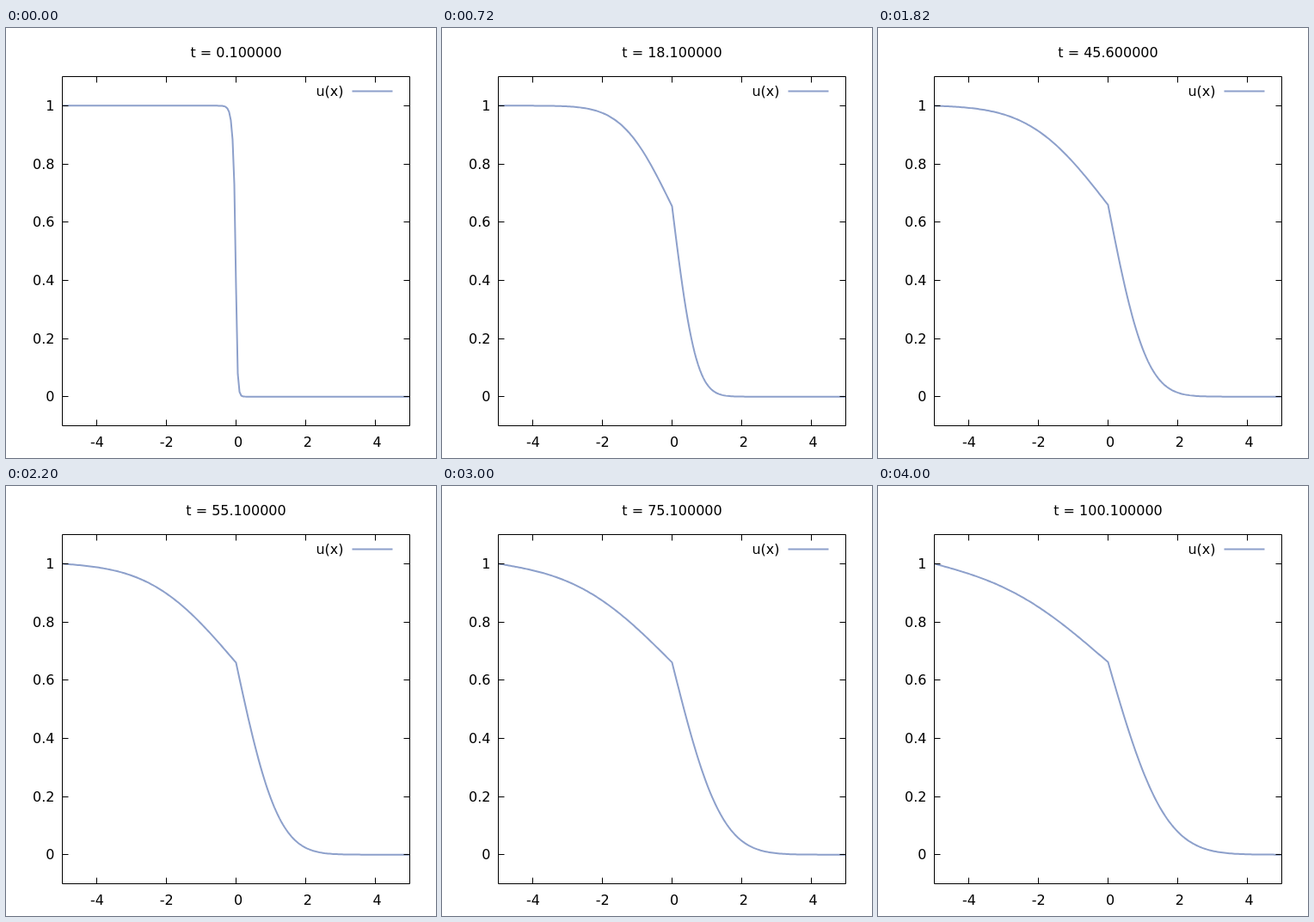
These frames come from a looping animation (500x500 px, 4.02 s). An HTML page:

```html
<!DOCTYPE html>
<html lang="en">
<head>
<meta charset="utf-8">
<title>Diffusion across two media</title>
<style>
  html, body { margin: 0; width: 100%; height: 100%; overflow: hidden; background: #fff; }
  svg { display: block; width: 500px; height: 500px; }
  text { font: 16px "DejaVu Sans", sans-serif; fill: #000; }
  .line { fill: none; stroke: #8da0cb; stroke-width: 2; stroke-linejoin: round; }
  .axes { fill: none; stroke: #000; stroke-width: 1; }
</style>
</head>
<body>
<svg viewBox="0 0 500 500">
  <text id="title" x="267.5" y="34" text-anchor="middle"></text>
  <text x="392.5" y="79" text-anchor="end">u(x)</text>
  <path class="line" d="M402.5 73.5H449.5"/>
  <path class="line" id="curve"/>
  <path class="axes" id="axes"/>
  <g id="labels"></g>
</svg>
<script>
const LEFT = 65.5, RIGHT = 469.5, TOP = 56.5, BOTTOM = 462.5, TICK = 7;
const FRAME_MS = 20, FRAMES = 201;
const CELLS = 200, DX = 10 / CELLS, DT = 0.1, STEPS_PER_FRAME = 5;
const D_LEFT = 1 / 30, D_RIGHT = 1 / 120;

const px = x => LEFT + (x + 5) / 10 * (RIGHT - LEFT);
const py = u => BOTTOM - (u + 0.1) / 1.2 * (BOTTOM - TOP);
const crisp = v => Math.floor(v) + 0.5;
const byId = id => document.getElementById(id);

// Diffusion number of the link between nodes i and i + 1.
const link = i => (i < CELLS / 2 ? D_LEFT : D_RIGHT) * DT / DX ** 2;

// One backward Euler step with fixed end values (Thomas algorithm).
function step(u) {
  const c = [0], d = [u[0]], next = u.slice();
  for (let i = 1; i < CELLS; i++) {
    const a = link(i - 1), b = link(i);
    const m = 1 + a + b - a * c[i - 1];
    c[i] = b / m;
    d[i] = (u[i] + a * d[i - 1]) / m;
  }
  for (let i = CELLS - 1; i > 0; i--) next[i] = d[i] + c[i] * next[i + 1];
  return next;
}

const toPath = u => "M" + u.map((v, i) =>
  px(-5 + i * DX).toFixed(2) + " " + py(v).toFixed(2)).join("L");

function solve() {
  let u = Array.from({ length: CELLS + 1 }, (_, i) => i < CELLS / 2 ? 1 : 0);
  u = step(u);
  const paths = [toPath(u)];
  while (paths.length < FRAMES) {
    for (let k = 0; k < STEPS_PER_FRAME; k++) u = step(u);
    paths.push(toPath(u));
  }
  return paths;
}

function addLabel(value, x, y, anchor) {
  const label = document.createElementNS("http://www.w3.org/2000/svg", "text");
  label.setAttribute("x", x);
  label.setAttribute("y", y);
  label.setAttribute("text-anchor", anchor);
  // Non-negative numbers keep a blank in place of the sign.
  label.textContent = (value < 0 ? "" : "\u00a0") + value;
  byId("labels").append(label);
}

function drawAxes() {
  let d = `M${LEFT} ${TOP}H${RIGHT}V${BOTTOM}H${LEFT}Z`;
  for (let x = -4; x <= 4; x += 2) {
    const p = crisp(px(x));
    d += `M${p} ${BOTTOM}v${-TICK}M${p} ${TOP}v${TICK}`;
    addLabel(x, px(x), 487, "middle");
  }
  for (let i = 0; i <= 5; i++) {
    const p = crisp(py(i / 5));
    d += `M${LEFT} ${p}h${TICK}M${RIGHT} ${p}h${-TICK}`;
    addLabel(i / 5, 56.5, p + 5.5, "end");
  }
  byId("axes").setAttribute("d", d);
}

const paths = solve();
const start = performance.now();

function render(ms) {
  const frame = Math.floor(ms / FRAME_MS) % FRAMES;
  byId("title").textContent = "t = " + (0.1 + frame * 0.5).toFixed(6);
  byId("curve").setAttribute("d", paths[frame]);
}

function tick() {
  render(performance.now() - start);
  requestAnimationFrame(tick);
}

drawAxes();
render(0);
requestAnimationFrame(tick);
</script>
</body>
</html>
```
